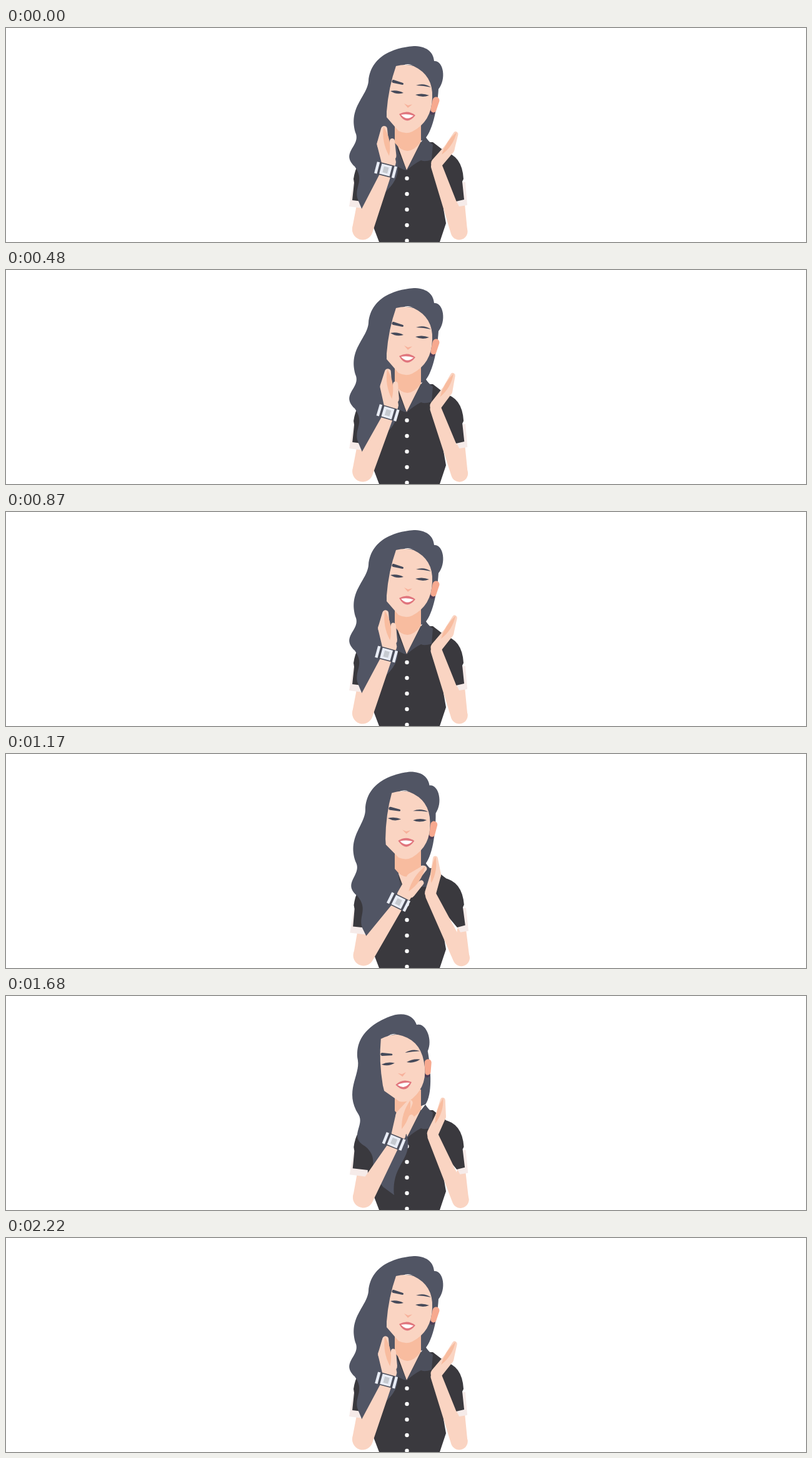
Write an HTML page with a canvas that moves like this. It is 1280 px wide and 343 px high and loops after 2250 ms.

```html
<!DOCTYPE html>
<html lang="en">
<head>
<meta charset="utf-8">
<title>Applause</title>
<style>
html, body { margin: 0; width: 100%; height: 100%; overflow: hidden; background: #fff; }
canvas { display: block; }
</style>
</head>
<body>
<canvas id="stage" width="1280" height="343"></canvas>
<script>
const ctx = document.getElementById('stage').getContext('2d');
const LOOP = 2250, CLAP = 450;
const HAIR = '#515564', SHIRT = '#3a393e', COLLAR = '#4c4f5c', CUFF = '#f6ebe9';
const SKIN = '#fad4c2', SHADE = '#f8bc9f', INK = '#454a5a';

const smooth = (t, a, b) => {
  const x = Math.min(1, Math.max(0, (t - a) / (b - a)));
  return x * x * (3 - 2 * x);
};
// Rises from a to b, falls from c to d.
const pulse = (t, a, b, c, d) => smooth(t, a, b) - smooth(t, c, d);

function turn(deg, x, y, dx, dy, draw) {
  ctx.save();
  ctx.translate(x + dx, y + dy);
  ctx.rotate(deg * Math.PI / 180);
  ctx.translate(-x, -y);
  draw();
  ctx.restore();
}

function shape(color, path) {
  ctx.fillStyle = color;
  ctx.fill(new Path2D(path));
}

function box(color, w, h, x = 0) {
  ctx.fillStyle = color;
  ctx.fillRect(x - w / 2, -h / 2, w, h);
}

// Tapered capsule: the hull of two circles.
function limb(color, x1, y1, r1, x2, y2, r2) {
  const a = Math.atan2(y2 - y1, x2 - x1);
  const b = Math.acos((r1 - r2) / Math.hypot(x2 - x1, y2 - y1));
  ctx.fillStyle = color;
  ctx.beginPath();
  ctx.arc(x1, y1, r1, a + b, a - b + 2 * Math.PI);
  ctx.arc(x2, y2, r2, a - b, a + b);
  ctx.fill();
}

// Two arcs between the same ends, bent to either side of the chord.
function lens(color, x1, y1, x2, y2, up, down) {
  const d = Math.hypot(x2 - x1, y2 - y1), nx = (y1 - y2) / d, ny = (x2 - x1) / d;
  const mx = (x1 + x2) / 2, my = (y1 + y2) / 2;
  ctx.fillStyle = color;
  ctx.beginPath();
  ctx.moveTo(x1, y1);
  ctx.quadraticCurveTo(mx - nx * up, my - ny * up, x2, y2);
  ctx.quadraticCurveTo(mx + nx * down, my + ny * down, x1, y1);
  ctx.fill();
}

function dot(color, x, y, r) {
  ctx.fillStyle = color;
  ctx.beginPath();
  ctx.arc(x, y, r, 0, 7);
  ctx.fill();
}

function torso() {
  shape(SHIRT, 'M578 215L622 183H683L705 200L700 290L704 313L694 343H597L589 322L578 292Z');
  shape(SKIN, 'M622 176H667L641 228Z');
  shape(COLLAR, 'M622 184L641 228Q629 226 620 216Z');
  for (let y = 241; y < 343; y += 25) dot('#fff', 641.5, y, 3.2);
}

function leftSleeve() {
  limb(SKIN, 569, 285, 8, 570, 322, 16);
  shape(CUFF, 'M557 240L549 286L578 290V278L554 275Z');
  shape(SHIRT, 'M578 205Q560 214 556 242L557 248L554 276L578 279L605 205Z');
}

function rightSleeve() {
  limb(SKIN, 727, 282, 7, 726, 324, 12);
  shape(CUFF, 'M731 247H735L738 284L725 286L720 276Z');
  shape(SHIRT, 'M683 187L700 198Q730 204 732 242L730 246L733 275L720 278L690 240Z');
}

function hair() {
  shape(HAIR, `M580 85C584 40 630 30 655 29C675 30 684 40 685 53
    C700 52 705 82 692 98C690 130 682 168 668 180L652 182L634 158L626 184L627 225
    C625 262 592 260 584 309L570 292L563 275
    C556 255 575 245 558 222C535 200 566 190 560 170C546 128 578 110 580 85Z`);
}

function neckAndCollar() {
  shape(SHADE, 'M622 150V184Q643 211 664 182V150Z');
  shape(COLLAR, 'M664 183L671 174Q676 182 683 187L681 211Q670 215 664 212Q654 217 641 228Z');
}

function face() {
  dot('#4d3e56', 682, 135, 4);
  limb('#f7a98f', 688, 116, 5.5, 684, 131, 4.5);
  shape(SKIN, 'M624 61Q640 57 652 61Q684 76 682 112Q681 150 650 166Q640 171 628 165L609 143V134Q612 95 624 61Z');
  lens('#fff', 635, 60, 651, 60, 4, -2);
  limb(INK, 620, 85.5, 2.5, 634.5, 89.5, 1.5);
  lens(INK, 656, 92, 680, 95, 6, -1);
  lens(INK, 615, 101, 636, 104, 4, 5);
  lens(INK, 655, 107, 677, 108, 4, 5);
  shape('#f7b19b', 'M637 121L643 124L650 122.500L643 128Z');
  lens('#e0757d', 629, 138, 655, 140, 9, 19);
  lens('#fff', 632, 139, 652, 140.5, 3, 10);
}

function watch() {
  turn(14.5, 0, 0, 607.5, 227.5, () => {
    box(COLLAR, 32, 20);
    for (const x of [-14.3, 14.3]) box('#e9edf6', 4.5, 19, x);
    box('#e9edf6', 17, 17);
    box('#c6cad0', 8, 10);
  });
}

function leftArm(arm, bend) {
  turn(12.8 * arm, 571, 325, 1.2 * arm, 0, () => {
    limb(SKIN, 570.5, 323, 16.5, 606, 238, 9);
    turn(33 * bend, 612, 218, 0, 0, () => {
      limb(SKIN, 612.5, 215, 11.5, 603, 186, 9.5);
      limb(SKIN, 603, 186, 9.5, 605, 162, 5);
      limb(SKIN, 616.5, 205, 8, 618, 181, 4);
      lens(SHADE, 604, 158, 613, 205, 10, 8);
    });
    watch();
  });
}

function rightArm(arm, bend) {
  turn(-7.4 * arm, 724, 325, 3.6 * arm, 0.8 * arm, () => {
    limb(SKIN, 725, 326, 13.5, 689, 222, 9);
    turn(-18.5 * bend, 689, 219, 0, 0, () => {
      limb(SKIN, 689, 217, 9, 709, 194, 8.5);
      limb(SKIN, 709, 194, 8.5, 719.5, 170, 4);
      lens(SHADE, 721, 167, 697, 203, 8, 6);
    });
  });
}

function render(now) {
  const t = now % LOOP, p = t % CLAP;
  const arm = pulse(p, 0, 122, 238, 450) * (0.965 + 0.035 * Math.sin(Math.PI * p / CLAP));
  const bendLeft = pulse(p, 45, 180, 255, 430);
  const bendRight = pulse(p, 0, 135, 250, 450);
  const tilt = pulse(t, 1080, 1345, 1935, 2210);
  const head = draw => turn(-14 * tilt, 640, 165, 0.5 * tilt, 0.8 * tilt, draw);

  ctx.fillStyle = '#fff';
  ctx.fillRect(0, 0, 1280, 343);
  torso();
  turn(-1.2 * arm, 575, 215, 0, 0, leftSleeve);
  turn(-1.7 * arm, 718, 210, 0, 0, rightSleeve);
  head(hair);
  neckAndCollar();
  head(face);
  rightArm(arm, bendRight);
  leftArm(arm, bendLeft);
}

const start = performance.now();
function tick() {
  render(performance.now() - start);
  requestAnimationFrame(tick);
}
tick();
</script>
</body>
</html>
```
